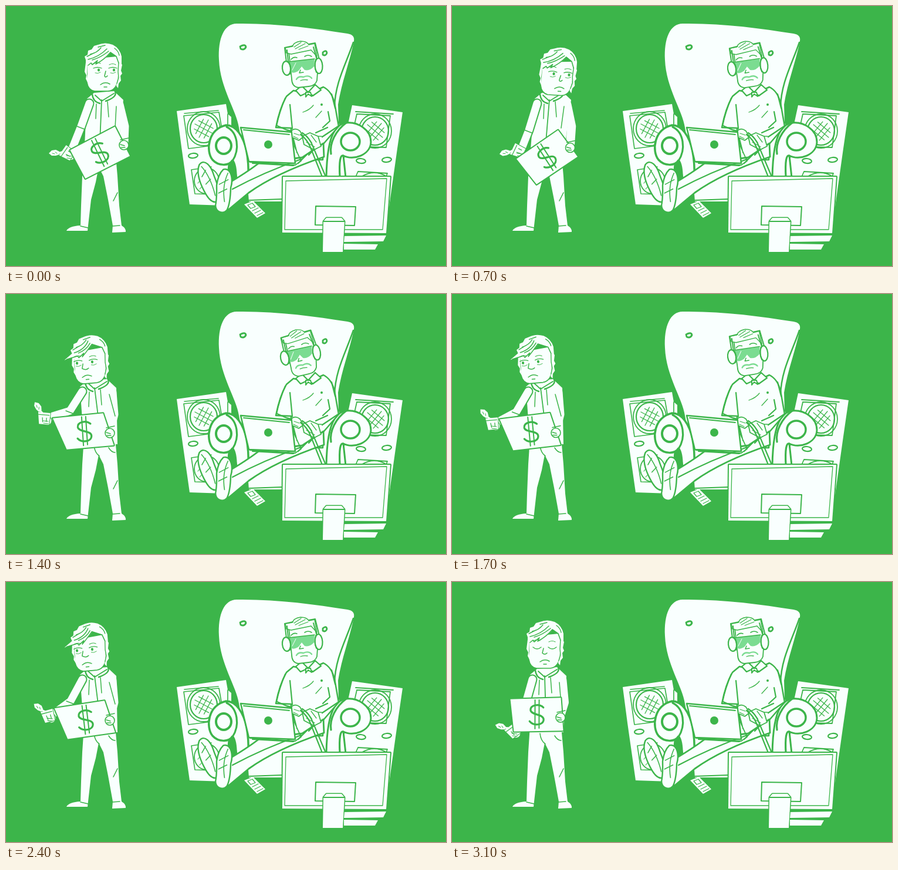
Write an HTML page with a canvas that moves like this. It is 750 px wide and 443 px high and loops after 3200 ms.

```html
<!DOCTYPE html>
<html lang="en">
<head>
<meta charset="utf-8">
<title>Two gamers</title>
<style>
  html, body { margin: 0; width: 100%; height: 100%; overflow: hidden; background: #3cb54a; }
  canvas { display: block; }
</style>
</head>
<body>
<canvas id="stage" width="750" height="443"></canvas>
<script>
const GREEN = '#3cb54a', WHITE = '#f9fffe', LENS = '#7bdc91';
const LOOP = 3200, STEP = 100;
const ctx = document.getElementById('stage').getContext('2d');
ctx.lineCap = ctx.lineJoin = 'round';

function fill(d, color = WHITE) {
  ctx.fillStyle = color;
  ctx.fill(new Path2D(d));
}
function line(d, width = 2, color = GREEN) {
  ctx.strokeStyle = color;
  ctx.lineWidth = width;
  ctx.stroke(new Path2D(d));
}
function shape(d, width = 2) {
  fill(d);
  line(d, width);
}
// Keeps the whole white area; the green edge lies outside it.
function cutout(d, edge = 2) {
  line(d, edge * 2);
  fill(d);
}
function oval(x, y, rx, ry, width = 2, color, angle = 0) {
  ctx.beginPath();
  ctx.ellipse(x, y, rx, ry, angle, 0, 7);
  if (color) { ctx.fillStyle = color; ctx.fill(); }
  if (width) { ctx.strokeStyle = GREEN; ctx.lineWidth = width; ctx.stroke(); }
}
function limb(d, width) {
  line(d, width + 4);
  line(d, width, WHITE);
}
function placed(x, y, degrees, draw) {
  ctx.save();
  ctx.translate(x, y);
  ctx.rotate(degrees * Math.PI / 180);
  draw();
  ctx.restore();
}

function speakerCone(x, y, lean) {
  oval(x, y, 28, 29, 1.8);
  oval(x, y, 23, 24, 2.2);
  placed(x, y, lean, () => {
    for (let i = -1; i <= 1; i++) {
      const half = 17 - Math.abs(i) * 3;
      line(`M${i * 8},${-half}V${half}M${-half},${i * 8}H${half}`, 1.3);
    }
  });
}

function drawSpeakers() {
  fill('M291,179L375,167L378,184L384,189V210L372,340L313,338L299,240Z');
  line('M378,184V205M303,187L363,181L367,204M303,187L311,243L350,238M304,183L362,178', 1.7);
  speakerCone(337, 209, 28);
  oval(319, 255, 8, 4, 2.2, null, -.1);
  line('M316,279L350,274M316,279L322,320L357,321', 1.7);
  oval(342, 298, 21, 22, 1.8);
  line('M330,285L352,314M335,282L355,306M327,302L342,283M330,312L352,287', 1.1);

  fill('M590,169L676,181L667,243L652,349L640,349L575,290L580,215Z');
  line('M598,184L655,187L648,241L615,240M598,184L594,202M596,180L660,184', 1.8);
  speakerCone(629, 213, 40);
  oval(605, 264, 8, 4, 2.2, null, .1);
  oval(649, 262, 8, 4, 2.2, null, -.1);
  line('M596,291L600,282L650,285L648,291M607,290Q628,278 648,290', 1.8);
}

function drawChair() {
  fill('M363,92C361,55 372,30 393,30C460,29 525,38 582,47Q595,49 593,60C586,95 572,130 566,168L567,200L580,215L560,292L472,300V333L414,333L410,280L397,207C393,178 365,140 363,92Z');
  line('M592,62C580,98 561,130 560,172', 2.5);
  line('M399,69Q408,64 409,70Q406,76 400,73ZM540,79Q546,74 547,80Q545,86 540,83Z', 2.8);

  shape('M375,203C392,203 405,222 410,248Q414,268 413,292L392,294Q392,270 386,263C380,273 362,273 352,262C340,247 344,210 375,203Z', 3.5);
  line('M376,206C395,215 399,244 386,264M393,294L388,268', 3.2);
  oval(371, 238, 13, 14, 4);
  shape('M580,199C600,197 622,211 622,232C621,254 592,264 575,255L579,292H546Q547,233 560,213Q568,200 580,199Z', 3);
  line('M580,199C562,212 551,234 554,252M575,255Q567,252 569,291', 3.2);
  oval(587, 231, 16, 15, 3.5);
}

function drawSeatedMan() {
  shape('M490,144L515,150L541,138Q555,145 560,165L567,205L541,235L540,262L484,262L486,208L460,207Q466,175 478,154Z', 2.5);
  line('M484,168L488,209M549,180L552,196L540,207M476,157Q466,180 461,204M555,150L561,174', 2.2);
  line('M506,181Q518,177 524,169M528,190L538,179M490,222L538,222', 1.3);
  shape('M494,144L504,136L515,147L502,153ZM515,147L527,134L537,143L523,153Z', 2.2);
  shape('M511,147H519L521,154L515,150L511,155Z', 2);
  oval(538, 168, 2, 2, 0, GREEN);

  // crossed legs
  shape('M541,234L542,257Q460,285 414,318L378,348L374,305Q410,284 432,267L505,258Z', 2.8);
  line('M386,312Q440,283 503,261M512,254L498,268M525,244L516,254M414,331L470,329', 2.2);
  placed(346, 300, -16, () => {
    cutout('M-7,-32C3,-40 10,-25 10,-8Q14,30 6,34Q-6,38 -11,12C-15,-8 -14,-23 -7,-32Z', 2.4);
    line('M-5,-29Q5,-8 4,25M-9,-12L0,-21M-6,2L4,-4', 1.6);
  });
  placed(371, 315, 8, () => {
    cutout('M-5,-35C5,-40 13,-23 10,-7Q13,20 9,31C3,40 -11,35 -9,22Q-9,10 -12,-8Q-12,-26 -5,-35Z', 2.4);
    line('M3,-31Q-4,-8 4,18M-9,-10L5,-20M-8,5L5,-4', 1.6);
  });

  shape('M400,207L487,215L493,268L414,265Z', 2.5);
  line('M487,215L492,240L503,264L493,271L416,266M405,211L483,219M420,268L490,272M490,226L496,250', 1.8);
  oval(447, 236, 7, 7, 0, GREEN);

  // forearms, hands and the cable
  line('M462,204L478,211L489,214M566,205L539,223M548,207L528,216', 2.4);
  shape('M487,212Q494,207 501,213L507,223L499,229L488,224Z', 1.7);
  shape('M505,222L518,216L532,222L537,239L525,245L508,236Z', 1.8);
  line('M491,217L500,220M490,222L498,226M513,222L521,233M520,220L529,232M512,232L526,240', 1.3);
  line('M505,216Q518,225 523,239L545,291M502,219Q514,228 519,241L539,291', 2.2);
}

function drawManHead(tilt) {
  placed(508, 135, tilt, () => {
    ctx.translate(-508, -135);
    shape('M482,78L526,69L532,100L530,127Q527,136 516,137L498,139Q487,137 487,124Z', 1.8);
    shape('M478,80L476,71L488,69Q490,62 502,60Q513,60 516,66L526,64L530,86L520,75L486,82Z', 1.4);
    line('M491,70L503,62M493,73L510,64M499,74L515,68', 1.2);
    line('M478,96L475,71L489,68M516,65L527,63L534,91M481,94L479,75M524,70L530,92', 2);
    line('M486,91Q490,86 496,88M509,86Q515,82 521,86', 1.6);
    fill('M481,95L526,90L525,103Q518,111 509,109L504,103L499,110Q489,117 484,111Z', LENS);
    line('M481,95L526,90', 1.4);
    line('M488,109L494,97', 1, WHITE);
    line('M502,109L500,114L507,113', 1.5);
    line('M495,125Q498,119 507,121Q516,117 521,123', 2.4, LENS);
    line('M502,127Q508,125 514,126', 1.3);
    oval(478, 106, 7, 12, 2.2, WHITE, -.1);
    oval(533, 102, 6.5, 13, 2.2, WHITE, -.05);
    line('M483,97Q487,106 484,116M528,91Q525,102 529,113', 1.8);
  });
}

function drawTelevision() {
  cutout('M472,291L655,291L648,387L471,386Z', 2);
  line('M477,298L649,294L642,381L475,381Z', 1.3);
  line('M528,341L596,342L594,374L527,373Z', 2);
  cutout('M541,367L546,361H572L577,367L574,419H540Z', 1.5);
  line('M541,367H577', 2);
  fill('M577,392L648,391L643,401L576,402ZM576,405L634,406L629,415L576,415Z');
  fill('M406,338L421,332L442,353L428,361Z');
  line('M412,339L420,336L425,342L417,345ZM420,349L430,344M424,353L434,348M428,357L438,352', 1.3);
}

// head x, y, tilt, gaze | shoulder shift | sign x, y, tilt, skew | left elbow | left hand | cup tilt | right hand
const POSES = [
  [0,    165, 110, 0, 4,    0, 160, 250, -27, 0, 128, 205, 107, 252, 0, 201, 237],
  [400,  175, 109, 0, 5,    2, 164, 256, -40, 0, 130, 210, 117, 245, -6, 203, 238],
  [1000, 184, 125, 8, 5,    4, 160, 260, -28, 3, 132, 213, 112, 251, -13, 200, 245],
  [1200, 180, 122, 6, 4,    2, 158, 256, -25, 4, 130, 211, 110, 250, -8, 199, 243],
  [1400, 143, 117, -5, -7, -12, 134, 234, -5, 9, 109, 199, 67, 213, 60, 177, 237],
  [2000, 143, 116, -5, -7, -12, 136, 235, -8, 7, 110, 203, 75, 231, 40, 177, 236],
  [2500, 143, 116, -5, -7, -12, 136, 235, -8, 7, 110, 203, 74, 229, 40, 177, 236],
  [2900, 158, 112, 0, 0,   -5, 145, 226, -1, 2, 126, 205, 106, 255, 19, 185, 231]
];
POSES.push([3100, ...POSES[7].slice(1)], [LOOP, ...POSES[0].slice(1)]);

function poseAt(time) {
  const next = POSES.findIndex(p => p[0] > time);
  const a = POSES[next - 1], b = POSES[next];
  const u = (time - a[0]) / (b[0] - a[0]), ease = u * u * (3 - 2 * u);
  return a.map((v, i) => v + (b[i] - v) * ease).slice(1);
}

function drawSign(skew) {
  cutout(`M${-43 - skew},-27L${43 - skew},-28L${43 + skew / 2},28L${-42 + skew},28Z`, 2);
  line('M11,-12C4,-19 -11,-17 -11,-8C-10,1 12,-1 11,9C10,19 -7,19 -13,11', 3.2);
  line('M-3,-25L-4,24M4,-25L3,23', 2);
}

function drawCup(tilt) {
  placed(0, 0, tilt - 55, () => {
    cutout('M-11,-10L10,-10L9,10L-8,10Z', 1);
    line('M-10,-6L8,-6M-3,-1L-2,6M4,-1V5', 1.3);
  });
  placed(0, 0, tilt, () => {
    line('M-10,-2L-17,0', 3, WHITE);
    fill('M-14,-3L-20,-6L-27,-5L-32,0L-27,4L-20,4L-14,2Z');
    line('M-26,0L-22,1M-21,-2L-18,0', 1);
  });
}

function drawBoyHead(gaze, closed) {
  const side = Math.sign(Math.round(gaze)), left = Math.min(gaze, 0);
  const tip = -29 + left * 2, part = 10 + left;
  shape('M-27,-20L-27,20Q-25,33 -14,35L9,35Q21,34 25,20L29,-4L27,-25Z', 1.6);
  // hair hanging at both sides of the face
  fill('M-29,-14L-26,-14L-27,6L-25,22L-29,14L-28,8L-31,2ZM25,-18L33,-10L31,0L33,5L30,9L31,17L27,22L26,30L23,26L26,10Z');
  line('M27,-14L26,2L27,12L24,22', 1.4);
  fill(`M${tip},-8L-29,-18L-31,-24L-26,-27L-25,-34L-19,-36L-15,-42L-8,-44Q4,-49 17,-44Q29,-38 32,-24L32,-8L28,-12L23,-24L${part + 4},-31Q${part - 6},-19 -14,-12L-10,-18L-20,-11L-18,-15L${tip},-8Z`);
  line(`M${tip + 4},-9L-20,-13L-18,-10L-9,-17L-12,-11Q${part - 8},-18 ${part + 3},-31L23,-24L27,-13`, 1.6);
  line(`M-25,-19Q-7,-23 ${part - 3},-37M-18,-18Q-4,-22 ${part},-33M-21,-28Q-10,-30 -3,-39M-27,-24L-15,-30M-8,-40L4,-43M20,-38Q27,-33 28,-26`, 1.5);
  for (const s of [-1, 1]) {
    const x = gaze + s * 13;
    line(`M${x - 7},${closed ? -1 : -4}Q${x},${closed ? 5 : -7} ${x + 7},${closed ? -1 : -4}`, 1.3);
    line(`M${x - 6},${-11 + s}Q${x},${-14 + s} ${x + 5},${-11 + s}`, 1.1);
    if (closed) continue;
    line(`M${x - 4},4Q${x},6 ${x + 5},3`, .9);
    oval(x + side * 2, -1, 2.1, 2.5, 0, GREEN);
  }
  line(`M${gaze - 2 + side * 3},1L${gaze - 4 + side * 3},9Q${gaze},13 ${gaze + 4},9`, 1.5);
  line(`M${gaze - 8},24Q${gaze},18 ${gaze + 8},23M${gaze - 2},28H${gaze + 3}`, 1.5);
}

function drawBoy(time) {
  const [hx, hy, tilt, gaze, b, sx, sy, signTilt, skew, ex, ey, lx, ly, cupTilt, rx, ry] = poseAt(time);

  fill('M133,245L186,245L190,290L193,340L197,374Q205,379 204,385L181,386L182,374L174,330L166,290L158,274L153,300L145,330L140,374L139,383L103,383Q107,375 127,374L128,340L130,290Z');
  line('M150,258Q151,270 159,276M175,262Q180,270 186,270M190,318L183,332M181,375L194,374M127,375L140,378', 1.6);

  limb(`M${193 + b},168L${(193 + b + rx) / 2 + 5},205L${rx},${ry - 5}`, 15);
  fill(`M${138 + b},158L${150 + b},148L${184 + b},145L${200 + b},160L190,256L133,256Z`);
  line(`M${163 + b},160L160,232M${152 + b},152L${163 + b},162L${184 + b},149`, 1.8);
  line(`M${147 + b},150Q${148 + b},163 ${160 + b},166M${186 + b},146Q${190 + b},155 ${170 + b},162`, 2.4);
  line(`M${154 + b},167L${153 + b},192M${173 + b},163L${175 + b},189M${188 + b},171L186,208`, 1.5);
  limb(`M${142 + b},166L${ex},${ey}L${lx + 3},${ly - 2}`, 13);
  line(`M${ex - 7},${ey}L${ex + 6},${ey + 5}`, 1.5);

  oval(lx + 3, ly + 3, 8, 8, 1.3, WHITE);
  placed(lx - 2, ly - 1, 0, () => drawCup(cupTilt));
  line(`M${lx - 4},${ly + 3}L${lx + 5},${ly + 4}M${lx - 3},${ly + 7}L${lx + 5},${ly + 8}`, 1.2);
  placed(sx, sy, signTilt, () => drawSign(skew));

  oval(rx, ry, 8, 8, 1.6, WHITE);
  line(`M${rx - 6},${ry - 1}L${rx + 1},${ry + 1}M${rx - 5},${ry + 4}L${rx + 2},${ry + 4}M${rx - 6},${ry - 9}L${rx + 8},${ry - 12}`, 1.4);
  placed(hx, hy, tilt, () => drawBoyHead(gaze, time >= 2800));
}

function manTilt(time) {
  const ramp = from => Math.min(1, Math.max(0, (time - from) / 300));
  return -6 * (ramp(600) - ramp(1500));
}

function draw(now) {
  const time = Math.floor(now % LOOP / STEP) * STEP;
  ctx.fillStyle = GREEN;
  ctx.fillRect(0, 0, 750, 443);
  drawSpeakers();
  drawChair();
  drawSeatedMan();
  drawManHead(manTilt(time));
  drawTelevision();
  drawBoy(time);
  requestAnimationFrame(draw);
}
requestAnimationFrame(draw);
</script>
</body>
</html>
```
